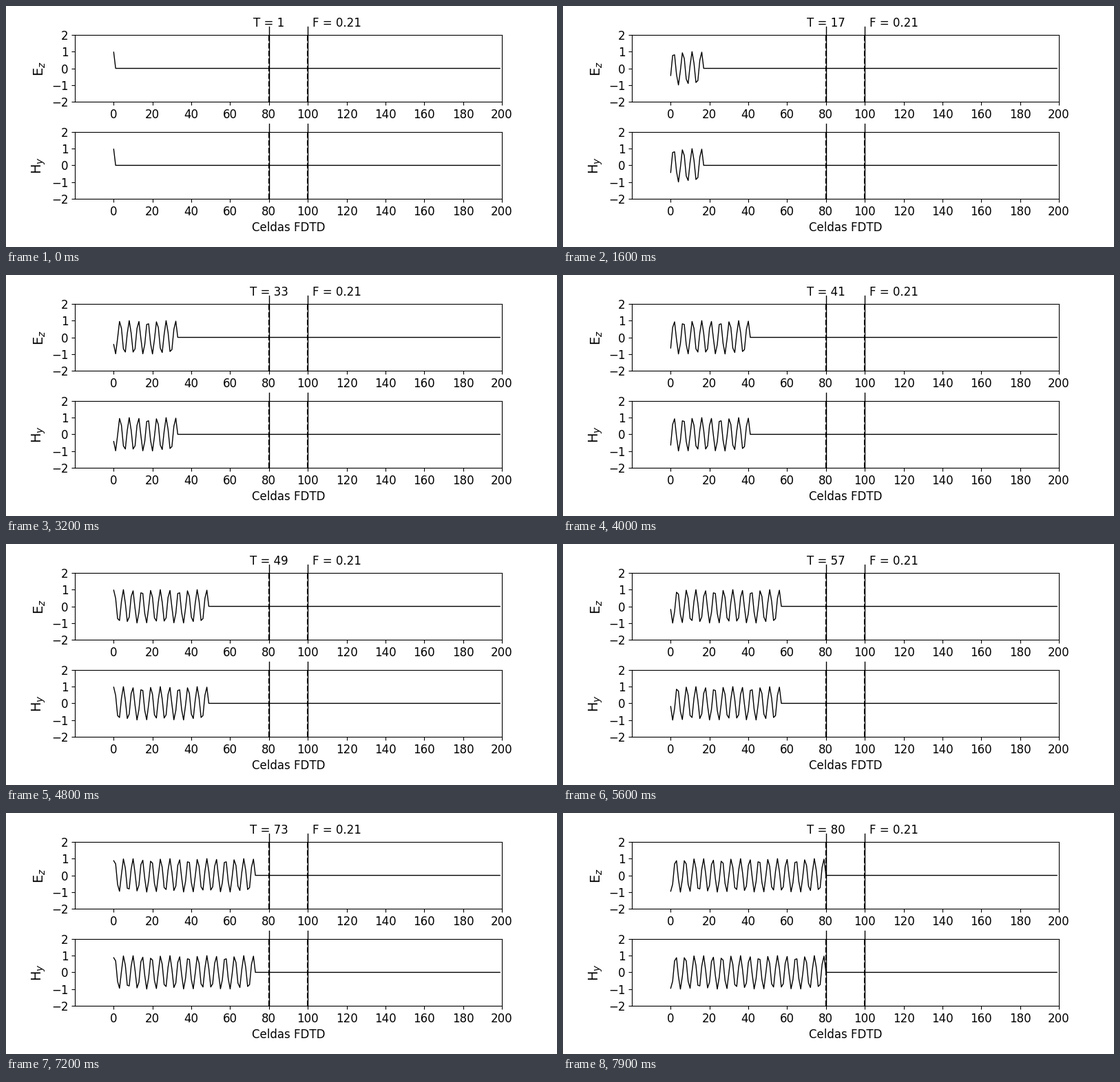
A matplotlib script for the animation above (8000 ms loop, 800 by 350 pixels).

```python
import numpy as np
import matplotlib.pyplot as plt
from matplotlib.animation import FuncAnimation

CELLS = 200
STEPS = 80
FREQ = 0.21
SLAB = (80, 100)

plt.rcParams["font.family"] = "DejaVu Sans"
plt.rcParams["font.size"] = 12

cells = np.arange(CELLS)


def field(t):
    """Sine wave entering at cell 0 and moving one cell per time step."""
    age = np.maximum(t - cells, 0)
    return np.sin(2 * np.pi * FREQ * age)


def make_panel(ax, label):
    ax.set_xlim(-20, 200)
    ax.set_ylim(-2, 2)
    ax.set_xticks(np.arange(0, 201, 20))
    ax.set_yticks(np.arange(-2, 3))
    ax.set_ylabel(label, fontsize=14)
    for x in SLAB:
        ax.axvline(x, color="k", linestyle="--", linewidth=1.5)
        ax.plot([x, x], [-2, 2.5], color="k", linewidth=1, clip_on=False)
    line, = ax.plot(cells, field(1), color="k", linewidth=1)
    return line


fig, (top, bottom) = plt.subplots(2, 1, figsize=(8, 3.5), dpi=100)
fig.subplots_adjust(left=0.125, right=0.9, bottom=0.2, top=0.88, hspace=0.45)

lines = [make_panel(top, "E$_z$"), make_panel(bottom, "H$_y$")]
bottom.set_xlabel("Celdas FDTD")
clock = top.text(80, 2.5, "T = 1", ha="center")
top.text(115, 2.5, f"F = {FREQ}", ha="center")


def update(i):
    t = i + 1
    for line in lines:
        line.set_ydata(field(t))
    clock.set_text(f"T = {t}")
    return [*lines, clock]


anim = FuncAnimation(fig, update, frames=STEPS, interval=100,
                     repeat=True, repeat_delay=0)
plt.show()
```
